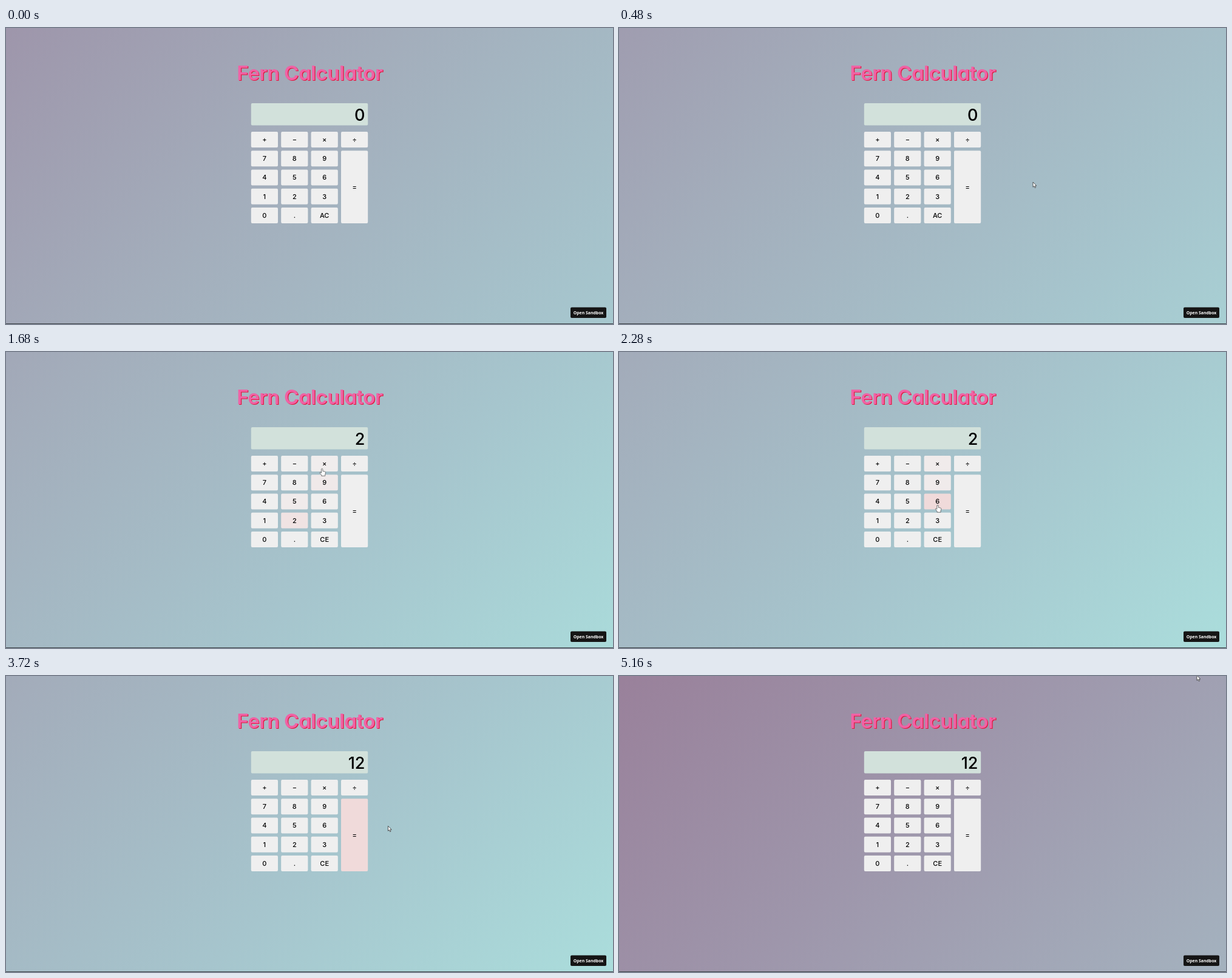
These frames come from a looping animation (1000 by 488 pixels, 5280 ms). An HTML page:

```html
<!DOCTYPE html>
<html lang="en">
<head>
<meta charset="utf-8">
<title>Fern Calculator</title>
<style>
  html, body { margin: 0; width: 100%; height: 100%; overflow: hidden; }
  svg { display: block; width: 100vw; height: 100vh; }
  text { font-family: Inter, "Open Sans", sans-serif; font-feature-settings: "cv11"; text-anchor: middle; }
  .title { font-size: 33px; font-weight: 600; letter-spacing: -0.4px; }
  .key { font-size: 11px; font-weight: 500; }
  .value { font-size: 27px; font-weight: 500; text-anchor: end; }
  .open { font-family: "Open Sans", sans-serif; font-size: 6.9px; font-weight: 700; fill: #fff; }
</style>
</head>
<body>
<svg id="stage" viewBox="0 0 1000 488">
  <defs>
    <linearGradient id="sky" gradientUnits="userSpaceOnUse">
      <stop offset="0" stop-color="#99809a"/>
      <stop offset=".255" stop-color="#9e96ab"/>
      <stop offset=".481" stop-color="#a3adbb"/>
      <stop offset=".745" stop-color="#a6c5cd"/>
      <stop offset="1" stop-color="#abdfdd"/>
    </linearGradient>
  </defs>
  <rect width="1000" height="488" fill="url(#sky)"/>
  <rect y="487" width="1000" height="1" fill="#3f454a"/>
  <text class="title" x="501.7" y="87.2" fill="#e3173e">Fern Calculator</text>
  <text class="title" x="500.5" y="86" fill="#f062a5">Fern Calculator</text>
  <rect x="403.8" y="124" width="192.4" height="36.5" rx="2" fill="#d2e1db"/>
  <text id="value" class="value" x="591.5" y="153"></text>
  <g id="keys"></g>
  <rect x="930" y="460.5" width="59" height="17.5" rx="2" fill="#151515"/>
  <text class="open" x="959.5" y="472">Open Sandbox</text>
  <g id="cursor" stroke-linejoin="round">
    <path id="arrow" d="M0 0V8.3L1.9 6.6L3.2 9.6L4.6 9L3.3 6.1H5.8Z" fill="#fff" stroke="#333" stroke-width=".8"/>
    <path id="hand" d="M-1.2 .8Q0-.6 1.1 .8V4.3L5 5.2Q6 5.6 5.9 6.8L5 10V12.2H-1V10.6L-3.6 7.4Q-4 6-2.7 6L-1.2 7.3Z" fill="#fff" stroke="#555" stroke-width=".8"/>
  </g>
</svg>
<script>
const LOOP = 5280, STEP = 120, FADE = 300, TURN = 3500;
const $ = id => document.getElementById(id);
const mix = (a, b, k) => a + (b - a) * k;

function add(parent, tag, attrs, content = "") {
  const el = document.createElementNS("http://www.w3.org/2000/svg", tag);
  for (const name in attrs) el.setAttribute(name, attrs[name]);
  el.textContent = content;
  return parent.appendChild(el);
}

// Rows of the keypad; "=" spans four rows.
const keys = ["+-×÷", "789=", "456", "123", "0.C"].flatMap((row, r) =>
  [...row].map((label, c) => {
    const key = { label, x: 403.8 + c * 49.4, y: 171 + r * 31.25, w: 44.2, h: label === "=" ? 119.7 : 26 };
    const { x, y, w, h } = key;
    key.box = add($("keys"), "rect", { x, y, width: w, height: h, rx: 2 });
    key.text = add($("keys"), "text", { class: "key", x: x + w / 2, y: y + h / 2 + 3.9 }, label === "-" ? "−" : label);
    return key;
  }));
const clear = keys.find(k => k.label === "C");

// Time, x and y of each stop of the pointer.
const path = [
  [240, 850, 225], [480, 682, 254], [960, 475, 279], [1440, 475, 279],
  [1740, 526, 182], [1980, 526, 182], [2160, 525, 252], [2640, 525, 252],
  [2940, 568, 277], [3480, 568, 277], [4440, 961, 86], [5160, 952, -1]
];

function pointer(t) {
  if (t < path[0][0]) return null;
  const i = path.findIndex(p => p[0] > t);
  if (i < 0) return path[path.length - 1].slice(1);
  const [t0, x0, y0] = path[i - 1], [t1, x1, y1] = path[i];
  const u = (t - t0) / (t1 - t0), k = u * u * (3 - 2 * u);
  return [mix(x0, x1, k), mix(y0, y1, k)];
}

const inside = (key, p) => p && p[0] >= key.x && p[0] <= key.x + key.w &&
  p[1] >= key.y && p[1] <= key.y + key.h;

// Share of the last FADE ms that the pointer spent on the key.
function glow(key, t) {
  const n = 15;
  let hits = 0;
  for (let i = 0; i < n; i++) if (inside(key, pointer(t - i * FADE / n))) hits++;
  return hits / n;
}

// cubic-bezier(.25, .1, .25, 1)
function ease(x) {
  let lo = 0, hi = 1;
  const curve = (a, b, s) => 3 * a * s * (1 - s) ** 2 + 3 * b * s * s * (1 - s) + s ** 3;
  for (let i = 0; i < 24; i++) {
    const mid = (lo + hi) / 2;
    if (curve(.25, .25, mid) < x) lo = mid; else hi = mid;
  }
  return curve(.1, 1, lo);
}

function drawSky(t) {
  const u = (t - TURN) / 7500;
  const shift = 3900 * (u < 0 ? 1 - ease(1 + u) : ease(u));
  const from = (shift - 1365) / 2, to = (shift + 1475) / 2;
  for (const [name, v] of [["x1", from], ["y1", from], ["x2", to], ["y2", to]])
    $("sky").setAttribute(name, v);
}

function draw(t) {
  drawSky(t);
  $("value").textContent = t < 1320 ? "0" : t < 2520 ? "2" : t < 3240 ? "6" : "12";
  clear.text.textContent = t < 1320 ? "AC" : "CE";
  for (const key of keys) {
    const tint = Math.round(mix(239, 208, glow(key, t)));
    key.box.setAttribute("fill", `rgb(240,${tint},${tint})`);
    if (tint === 239) key.box.setAttribute("fill", "#efefef");
  }
  const p = pointer(t), over = keys.some(k => inside(k, p));
  $("cursor").style.display = p ? "" : "none";
  if (p) $("cursor").setAttribute("transform", `translate(${p})`);
  $("arrow").style.display = over ? "none" : "";
  $("hand").style.display = over ? "" : "none";
}

const start = performance.now();
function tick() {
  const t = (performance.now() - start) % LOOP;
  draw(Math.floor(t / STEP) * STEP);
  requestAnimationFrame(tick);
}
tick();
</script>
</body>
</html>
```
